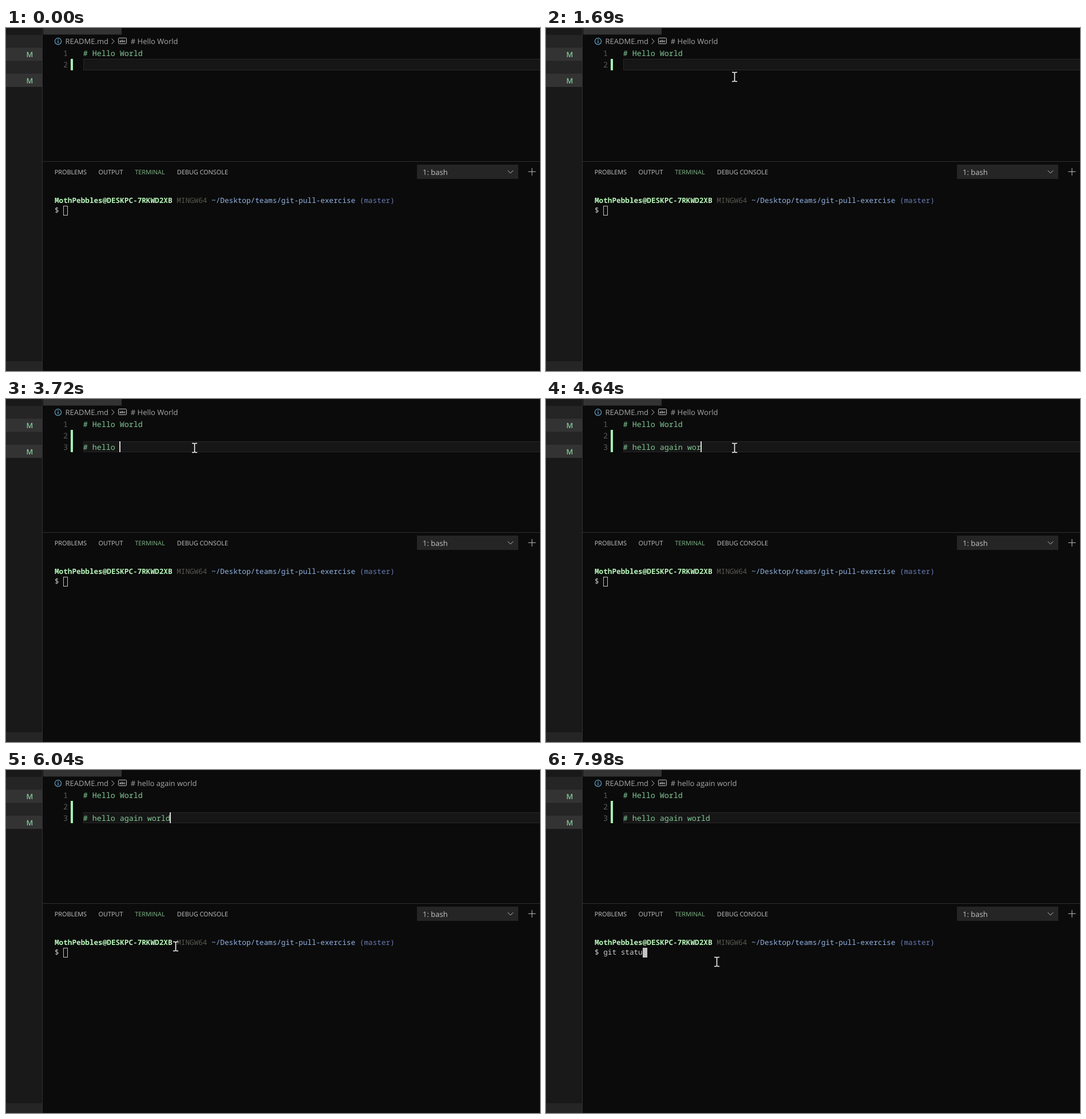
Animation, 933 px wide and 600 px high, one loop 8 s. Source, as an HTML page:

```html
<!DOCTYPE html>
<html lang="en">
<head>
<meta charset="utf-8">
<title>Editor and terminal</title>
<style>
  html, body { margin: 0; width: 100%; height: 100%; overflow: hidden; background: #0b0b0b; }
  svg { display: block; width: 933px; height: 600px; }
  text { white-space: pre; text-rendering: geometricPrecision; }
  .ui { font: 13px "Open Sans", "Noto Sans", sans-serif; fill: #a8a8a8; }
  .tabs { font: 10.9px "Open Sans", "Noto Sans", sans-serif; fill: #c6c6c6; }
  .code { font: 500 13.35px "Noto Sans Mono", "DejaVu Sans Mono", monospace; fill: #82c796; }
  .term { font: 500 12.7px "Noto Sans Mono", "DejaVu Sans Mono", monospace; fill: #cccccc; }
  .num { fill: #5c5c5c; text-anchor: end; }
  .mod { font: 600 12.8px "Open Sans", "Noto Sans", sans-serif; fill: #82c796; text-anchor: middle; }
  .line { fill: none; stroke: #c0c0c0; }
  .abc { font: 700 6.2px "Open Sans", sans-serif; fill: #c5c5c5; text-anchor: middle; }
</style>
</head>
<body>
<svg viewBox="0 0 933 600">
  <rect width="933" height="600" fill="#0b0b0b"/>

  <!-- sidebar -->
  <rect width="64" height="600" fill="#191919"/>
  <path d="M0 12H63V103H0ZM0 583H63V600H0Z" fill="#252525"/>
  <path d="M0 34.5H63V57.5H0ZM0 80H63V103H0ZM65 0H202V11.5H65Z" fill="#333"/>
  <path d="M63.5 0V600M64 233.5H933" stroke="#303030"/>
  <text class="mod" x="41.3" y="51">M</text>
  <text class="mod" x="41.3" y="97">M</text>

  <!-- breadcrumb -->
  <g fill="none" stroke="#64a5cc" stroke-width="1.2">
    <circle cx="91" cy="23.3" r="5.6"/>
    <path d="M91 22.3V26.6M91 19.8V21.2" stroke-width="1.4"/>
  </g>
  <path class="line" d="M184.5 18.5L189 23.3L184.5 28"/>
  <rect class="line" x="196.5" y="17.5" width="14" height="10" rx="1"/>
  <text class="abc" x="203.5" y="24.7">abc</text>
  <text class="ui" x="103.5" y="28">README.md</text>
  <text class="ui" x="217.8" y="28" id="crumb"></text>

  <!-- editor -->
  <rect id="current" x="135.5" width="820" fill="#161616" stroke="#282828"/>
  <rect id="gutter" x="113" y="54" width="4" fill="#a5efb5"/>
  <g class="code">
    <text class="num" x="108" y="49">1</text>
    <text class="num" x="108" y="68.5">2</text>
    <text class="num" x="108" y="88.5" id="third">3</text>
    <text x="134.7" y="49"># Hello World</text>
    <text x="134.7" y="88.5" id="typed"></text>
  </g>
  <rect id="caret" width="2" height="19" fill="#d8d8d8"/>

  <!-- panel header -->
  <g class="tabs">
    <text x="84.7" y="256.3">PROBLEMS</text>
    <text x="161.6" y="256.3">OUTPUT</text>
    <text x="225.2" y="256.3" fill="#82b98a">TERMINAL</text>
    <text x="298.7" y="256.3">DEBUG CONSOLE</text>
  </g>
  <rect x="718" y="239" width="177" height="25" fill="#252525"/>
  <text class="ui" x="728" y="257" style="fill:#c4c4c4">1: bash</text>
  <path class="line" d="M876.8 249.2L881.5 254L886.2 249.2M919 245V258M912.5 251.3H925.5"/>

  <!-- terminal -->
  <text class="term" x="85" y="306"><tspan fill="#b8f8ba" font-weight="600">MothPebbles@DESKPC-7RKWD2XB</tspan><tspan fill="#5a5852"> MINGW64</tspan><tspan fill="#93b4e4"> ~/Desktop/teams/git-pull-exercise</tspan><tspan fill="#6a7db4"> (master)</tspan></text>
  <text class="term" x="85" y="323" id="command"></text>
  <rect id="block" y="311.5" width="7" height="16" stroke="#c4c4c4"/>

  <path id="mouse" d="M-4.5 -8H-1.5L0 -7L1.5 -8H4.5M0 -7V7M-4.5 8H-1.5L0 7L1.5 8H4.5" fill="none" stroke="#fff" stroke-width="1.5"/>
</svg>
<script>
const LOOP = 8000, TICK = 77.7, START = 130;
const HEADING = "# hello again world", COMMAND = "git statu";
const EDIT_CHAR = 8.01, TERM_CHAR = 7.62;

const headingKeys = [2550, 2850, 3000, 3160, 3240, 3400, 3550, 3630, 3780, 3860,
  4020, 4100, 4250, 4410, 4560, 4560, 4640, 4790, 4960];
const commandKeys = [7280, 7360, 7510, 7670, 7670, 7820, 7820, 7900, 7980];
const caretToggles = [1220, 1690, 2000, 2470, 2550, 5420, 5890, 6520];
const NEW_LINE = 2000, CRUMB = 5340, FOCUS = 6520;

// time, x, y
const path = [
  [130, 821, 564], [1060, 329, 85], [1140, 329, 85], [1220, 334, 87], [1370, 329, 85],
  [5812, 329, 85], [5890, 333, 108], [6040, 296, 309], [6200, 298, 335],
  [6440, 298, 335], [6520, 304, 337], [6750, 298, 335]
];

const el = id => document.getElementById(id);
const set = (id, attrs) => {
  for (const name in attrs) el(id).setAttribute(name, attrs[name]);
};
const show = (id, on) => set(id, { visibility: on ? "visible" : "hidden" });
const count = (times, t) => times.filter(at => at <= t).length;

function mouseAt(t) {
  const i = path.findIndex(p => p[0] > t);
  if (i < 0) return path[path.length - 1].slice(1);
  if (i === 0) return path[0].slice(1);
  const [t0, x0, y0] = path[i - 1], [t1, x1, y1] = path[i];
  const u = (t - t0) / (t1 - t0), k = u * u * (3 - 2 * u);
  return [Math.round(x0 + (x1 - x0) * k), Math.round(y0 + (y1 - y0) * k)];
}

function draw(t) {
  const split = t >= NEW_LINE, focused = t >= FOCUS;
  const top = split ? 74 : 54;
  const typed = count(headingKeys, t), entered = count(commandKeys, t);

  el("crumb").textContent = t >= CRUMB ? HEADING : "# Hello World";
  el("typed").textContent = HEADING.slice(0, typed);
  el("command").textContent = "$ " + COMMAND.slice(0, entered);

  show("third", split);
  set("current", { y: top + 0.5, height: split ? 18 : 19 });
  set("gutter", { height: split ? 39 : 20 });
  set("caret", { x: Math.max(135, Math.round(134 + typed * EDIT_CHAR)), y: top });
  show("caret", count(caretToggles, t) % 2);
  set("block", {
    x: Math.round(100 + entered * TERM_CHAR) + 0.5,
    fill: focused ? "#c4c4c4" : "none"
  });

  const tick = START + Math.floor((t - START) / TICK + 0.1) * TICK;
  const [x, y] = mouseAt(tick);
  set("mouse", { transform: `translate(${x + 0.5} ${y + 0.5})` });
  show("mouse", t >= START);
}

function frame() {
  draw(performance.now() % LOOP);
  requestAnimationFrame(frame);
}
frame();
</script>
</body>
</html>
```
